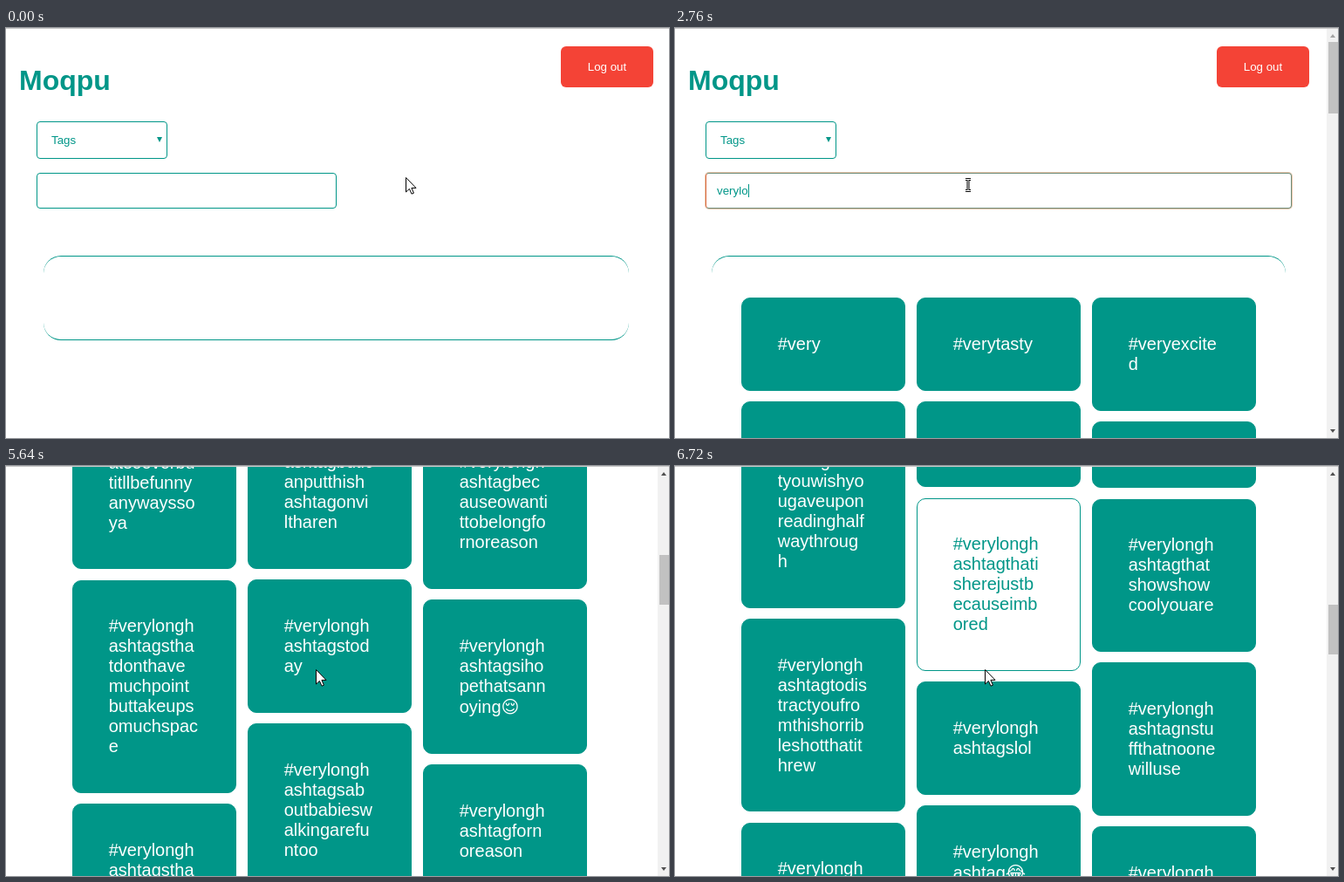
Animation, 760 px wide and 470 px high, one loop 7800 ms. Source, as an HTML page:

```html
<!DOCTYPE html>
<html lang="en">
<head>
<meta charset="utf-8">
<title>Tag search</title>
<style>
  :root { --teal: #009688; }
  html, body { margin: 0; width: 100%; height: 100%; overflow: hidden; background: #fff; }
  #stage {
    position: relative; width: 760px; height: 470px; overflow: hidden; background: #fff;
    font: 13.333px "Liberation Sans", Arial, "DejaVu Sans", sans-serif; color: var(--teal);
  }
  #stage * { box-sizing: border-box; }
  #doc, #doc > *, #stage > * { position: absolute; }
  #doc { left: 0; top: 0; width: 760px; height: 3600px; }
  #topline { left: 0; top: 0; width: 760px; height: 1px; background: #c9c9c9; }
  h1 { left: 15px; top: 42px; margin: 0; font-size: 32px; line-height: 37px; }
  #logout {
    left: 636px; top: 21px; width: 106px; height: 47px; border-radius: 6px;
    background: #f44336; color: #fff; text-align: center; line-height: 47px;
  }
  #select, #field { left: 35px; border: 1px solid var(--teal); border-radius: 4px; white-space: pre; }
  #select { top: 107px; width: 150px; height: 43px; padding-left: 16px; line-height: 41px; }
  #select::after {
    content: ""; position: absolute; left: 137px; top: 17px;
    border: solid transparent; border-width: 6px 3.5px 0; border-top-color: var(--teal);
  }
  #field { top: 166px; width: 344px; height: 41px; padding-left: 12px; line-height: 39px; }
  #field.focus {
    border-color: #6d8c78 #d9693f; box-shadow: 0 0 0 1px rgba(222, 160, 118, .6);
  }
  .bar #field.focus { border-right-color: #6d8c78; }
  #caret { display: inline-block; width: 1px; height: 15px; vertical-align: -3px; background: var(--teal); }
  #panel {
    left: 43px; top: 261px; width: 671px; height: 97px; border-radius: 20px;
    border: solid var(--teal); border-width: 1px 0;
  }
  .bar #logout { left: 621px; }
  .bar #panel { left: 42px; width: 658px; height: 3240px; }
  .page { left: 76px; top: 309.2px; }
  .col { position: absolute; top: 0; width: 188px; }
  .card {
    margin-bottom: 12.2px; padding: 40.75px; border: 1px solid var(--teal); border-radius: 10px;
    background: var(--teal); color: #fff; font-size: 20px; line-height: normal; white-space: pre;
  }
  #scroll { left: 747px; top: 1px; width: 15px; height: 469px; background: #f1f1f1; display: none; }
  .bar #scroll { display: block; }
  #scroll i { position: absolute; border: solid transparent; left: 4px; }
  #up { top: 6px; border-width: 0 3.5px 4px !important; border-bottom-color: #a3a3a3 !important; }
  #down { top: 459px; border-width: 4px 3.5px 0 !important; border-top-color: #505050 !important; }
  #thumb { position: absolute; left: 2px; width: 11px; background: #c1c1c1; }
  #mouse { left: 0; top: 0; overflow: visible; }
</style>
</head>
<body>
<div id="stage">
  <div id="doc">
    <h1>Moqpu</h1>
    <div id="logout">Log out</div>
    <div id="select">Tags</div>
    <div id="field"><span id="typed"></span><span id="caret"></span></div>
    <div id="panel"></div>
  </div>
  <div id="scroll"><i id="up"></i><div id="thumb"></div><i id="down"></i></div>
  <div id="topline"></div>
  <svg id="mouse" width="16" height="22">
    <path id="arrow" d="M.5.5V17L4.4 13.4 7 19.2 9.4 18.2 6.9 12.4H12Z" fill="#fff" stroke="#000"/>
    <g id="beam" fill="none">
      <path d="M1 1.5H7M4 1.5V14.5M1 14.5H7" stroke="#000" stroke-width="3"/>
      <path d="M1 1.5H7M4 1.5V14.5M1 14.5H7" stroke="#fff"/>
    </g>
  </svg>
</div>
<script>
const LOOP = 7800, STEP = 120, QUERY = 'verylonghashtag';
const $ = id => document.getElementById(id);

// In card text "/" breaks a line and "~" is the shared opening of the long tags.
const funny = '~forn/oreasonwh/atsoeverbu/titllbefunny/anywaysso/ya';
const cool = '~sare/coolthisisa/verylongha/dhtag';
const plain = '~forn/oparticularr/eason';
// Numbers between cards are extra space.
const left = [
  '~that/justkeepson/goingandgo/ingandnever/seemstoge/ttotheend', 4, funny,
  '~stha/tdonthave/muchpoint/buttakeups/omuchspac/e',
  '~stha/tyouwishyo/ugaveupon/readinghalf/waythroug/h',
  '~todis/tractyoufro/mthishorrib/leshotthatit/hrew', '~sare/fun'
];
const middle = [
  '~sfor/days', '~s', '~butic/anputthish/ashtagonvi/ltharen', '~stod/ay',
  '~sab/outbabiesw/alkingarefu/ntoo', '~thati/sherejustb/ecauseimb/ored', '~slol', '~😂'
];
const right = [
  plain, '~yes', '~bec/auseowanti/ttobelongfo/rnoreason', '~siho/pethatsann/oying😌',
  '~forn/oreason', '~that/showshow/coolyouare', '~nstu/ffthatnoone/willuse', '~sagain'
];

// [time, thumb height, columns]
const pages = [
  [2280, 78, [['#very', '#verynice'], ['#verytasty', '#verygood'], ['#verycool', '#veryhappy']]],
  [2760, 82, [['#very', '#verynice'], ['#verytasty', '#verygood'], ['#veryexcite/d', '#veryhappy']]],
  [3240, 67, [['#verylong', '#verylongd/ay'], ['#verylongh/air', '#verylong'], ['#verylongw/alk', '#verylong']]],
  [3600, 67, [['#verylongh/air', '#verylongh'], ['~', '#verylongh'], ['#verylongh/airdontcare', '~s']]],
  [4080, 55, [[funny], [cool], [plain]]],
  [4320, 57, [left, [cool], [plain]]],
  [4680, 57, [left, middle, right]]
].map(([time, thumb, cols]) => {
  const el = add($('doc'), 'page');
  cols.forEach((cards, i) => {
    const col = add(el, 'col');
    col.style.left = i * 201 + 'px';
    for (const c of cards) {
      if (typeof c === 'number') add(col).style.height = c + 'px';
      else add(col, 'card').textContent = c.replace('~', '#verylongh/ashtag').replace(/\//g, '\n');
    }
  });
  return [time, thumb, el];
});
const hovered = pages[pages.length - 1][2].children[1].children[5];

const keys = [1680, 1800, 2040, 2160, 2400, 2760, 2880];
for (let i = 0; i < 8; i++) keys.push(3120 + i * STEP);
const scrolls = [[0, 0], [5520, 340], [5640, 696], [5760, 846], [5880, 970], [6000, 1070], [6120, 1134], [6240, 1165]];
const mouse = [[0, 458, 171], [120, 394, 172], [240, 332, 172, 1], [5040, 346, 206], [5160, 355, 233]];

function add(parent, cls = '') {
  const el = document.createElement('div');
  el.className = cls;
  return parent.appendChild(el);
}
const at = (list, t) => list.filter(e => e[0] <= t).pop();
const easeOut = (t, start, length) => {
  const u = Math.min(1, Math.max(0, (t - start) / length));
  return 1 - (1 - u) ** 2;
};
const blend = (a, b, k) => `rgb(${a.map((v, i) => Math.round(v + (b[i] - v) * k))})`;

function render(t) {
  const page = at(pages, t), scroll = at(scrolls, t)[1];
  $('stage').className = page ? 'bar' : '';
  for (const p of pages) p[2].style.display = p === page ? 'block' : 'none';
  $('doc').style.transform = `translateY(${-scroll}px)`;
  if (page) {
    $('thumb').style.height = page[1] + 'px';
    $('thumb').style.top = 15 + Math.round(scroll * .1229 + .2) + 'px';
  }
  $('up').style.setProperty('border-bottom-color', scroll ? '#505050' : '#a3a3a3', 'important');

  const pressed = keys.filter(k => k <= t), focus = t >= 720;
  const since = t - (pressed.length ? pressed[pressed.length - 1] : 700);
  $('typed').textContent = QUERY.slice(0, pressed.length);
  $('caret').style.visibility = focus && Math.floor(since / 500) % 2 === 0 ? 'visible' : 'hidden';
  $('field').className = focus ? 'focus' : '';
  $('field').style.width = (page ? 672 : 344 + 343 * easeOut(t, 720, 480)) + 'px';

  const k = easeOut(t, 6240, 480), teal = [0, 150, 136], white = [255, 255, 255];
  hovered.style.background = blend(teal, white, k);
  hovered.style.color = blend(white, teal, k);

  const [, x, y, beam] = at(mouse, t);
  $('mouse').style.transform = `translate(${x}px, ${y}px)`;
  $('arrow').style.display = beam ? 'none' : '';
  $('beam').style.display = beam ? '' : 'none';
}

const start = performance.now();
function tick() {
  const t = (performance.now() - start) % LOOP;
  render(Math.floor(t / STEP) * STEP);
  requestAnimationFrame(tick);
}
tick();
</script>
</body>
</html>
```
